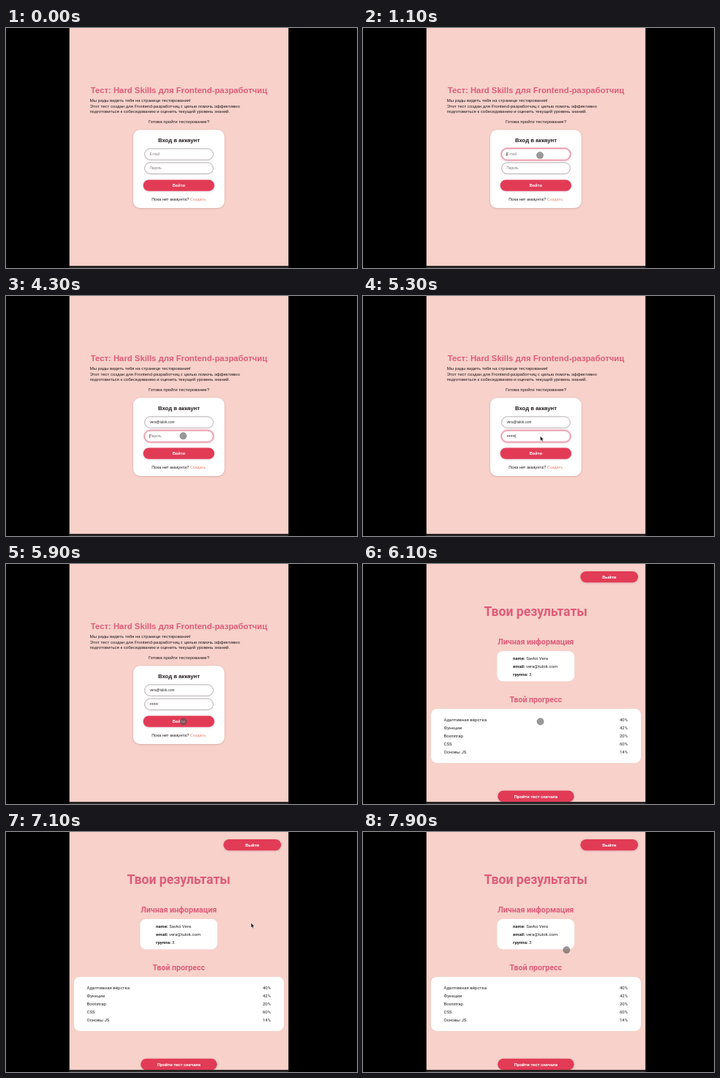
Animation of 480x328 px, one loop 8000 ms. Source, as an HTML page:

```html
<!DOCTYPE html>
<html lang="ru">
<head>
<meta charset="utf-8">
<title>Тест: вход и результаты</title>
<style>
html, body { margin: 0; width: 100%; height: 100%; overflow: hidden; background: #000; }
svg { display: block; width: 100vw; height: 100vh; }
.arial { font-family: "Liberation Sans", Arial, sans-serif; fill: #1d1718; }
.roboto { font-family: Roboto, sans-serif; fill: #222; }
text { white-space: pre; }
</style>
</head>
<body>
<svg id="stage" viewBox="0 0 480 328"></svg>
<script>
const LOOP = 8000, STEP = 200;
const EMAIL = "vera@tulok.com";
const PINK = "#f7d1ca", ROSE = "#df5c79", RED = "#e23a57";

const text = (x, y, size, str, attrs = "") =>
  `<text x="${x}" y="${y}" font-size="${size}" ${attrs}>${str}</text>`;
const mid = 'text-anchor="middle"', bold = 'font-weight="700"';
const title = (x, y, size, str) => text(x, y, size, str, `${mid} ${bold} fill="${ROSE}"`);
const box = (x, y, w, h, r, fill, attrs = "") =>
  `<rect x="${x}" y="${y}" width="${w}" height="${h}" rx="${r}" fill="${fill}" ${attrs}/>`;
const button = (x, y, w, size, label) =>
  box(x, y, w, 15.4, 7.7, RED, 'filter="url(#soft)"') +
  text(x + w / 2, y + 9.8, size, label, `${mid} ${bold} fill="#fff"`);
const field = (id, y) => `
  <rect id="${id}Glow" x="188.7" y="${y - 0.7}" width="95.6" height="16.9" rx="8.4"
    fill="none" stroke="#ec7f97" stroke-opacity=".4" stroke-width="2.4"/>
  <rect id="${id}Box" x="189.6" y="${y}" width="93.8" height="15.4" rx="7.7" fill="#fff" stroke-width=".9"/>
  ${text(196.5, y + 9.2, 4.7, "", `id="${id}Text"`)}
  <path id="${id}Caret" stroke="#222" stroke-width=".6"/>`;

const login = `<g id="login" class="arial">
  ${text(115.7, 89.3, 11.32, "Тест: Hard Skills для Frontend-разработчиц", `${bold} fill="${ROSE}"`)}
  ${["Мы рады видеть тебя на странице тестирования!",
     "Этот тест создан для Frontend-разработчиц с целью помочь эффективно",
     "подготовиться к собеседованию и оценить текущий уровень знаний."]
    .map((s, i) => text(114.8, 101.4 + i * 7.1, 6.02, s)).join("")}
  ${text(236.5, 130.3, 6.02, "Готова пройти тестирование?", mid)}
  ${box(174, 139.3, 124.6, 106.8, 9.5, "#fff", 'filter="url(#soft)"')}
  ${text(236.5, 155.6, 7.7, "Вход в аккаунт", `${mid} ${bold}`)}
  ${field("email", 164.9)}${field("pass", 184)}
  ${button(187.6, 207.4, 97.4, 5.65, "Войти")}
  ${text(236.2, 235.8, 5.67, 'Пока нет аккаунта? <tspan fill="#e8806f">Создать</tspan>', mid)}
</g>`;

const info = [["name", "Savko Vera"], ["email", EMAIL], ["группа", "3"]];
const progress = [["Адаптивная вёрстка", 40], ["Функции", 42], ["Bootstrap", 20], ["CSS", 60], ["Основы JS", 14]];
const results = `<g id="results" class="roboto">
  ${button(297.4, 9.9, 78.8, 6.1, "Выйти")}
  ${title(236.2, 71.3, 17.6, "Твои результаты")}
  ${title(236.2, 110, 10.65, "Личная информация")}
  ${box(183.4, 119, 105.7, 41.3, 8, "#fff")}
  ${info.map(([k, v], i) =>
    text(205, 130.6 + i * 11, 6, `<tspan font-weight="700">${k}:</tspan> ${v}`)).join("")}
  ${title(236.2, 189, 10.55, "Твой прогресс")}
  ${box(93, 197.9, 287, 74, 8, "#fff")}
  ${progress.map(([k, v], i) => text(110.5, 215.1 + i * 10.95, 6.05, k) +
    text(362.2, 215.1 + i * 10.95, 6.05, v + "%", 'text-anchor="end"')).join("")}
  ${button(184.2, 309.8, 104.4, 6.02, "Пройти тест сначала")}
</g>`;

const popup = `<g id="popup" class="roboto">
  ${box(224.5, -10, 190, 153, 2, "#1f2022", 'filter="url(#deep)"')}
  <g fill="none" stroke="#3d4043" stroke-width="1.5" stroke-linecap="round">
    <path d="M226 14C231 10 233 20 239 17S245 10 250 14S257 21 263 18S268 12 271 17"/>
    <path d="M224.5 3Q229 1 231 -2M280 24H340M345 18C351 23 357 20 360 14S367 4 372 9S381 17 387 8"/>
    <circle cx="351" cy="1" r="6"/>
  </g>
  ${box(281, 14, 53, 11, 1.5, "#292b2f", 'stroke="#45484d" stroke-width=".8"')}
  ${box(305, -5, 32, 20, 2, "#26303f", 'stroke="#46536a" stroke-width=".8"')}
  ${text(310, 12.5, 11, "***", `${bold} fill="#8ab4f8"`)}
  <path d="M332 3V10" stroke="#8ab4f8"/>
  <path d="M297 -6L308.5 13.5H285.5Z" fill="#f28b82" stroke="#f28b82" stroke-linejoin="round"/>
  <path d="M297 1V7M297 9V10.7" stroke="#29211f" stroke-width="1.7"/>
  ${text(234.4, 51.6, 8.5, "Проверьте сохраненные пароли", 'font-weight="500" fill="#e8eaed"')}
  ${["Пароль, который вы только что использовали, был",
     "результате утечки данных. Чтобы защитить свои аккаунты,",
     "измените его прямо сейчас и проверьте сохраненные в",
     "Tulkon Менеджере паролей."]
    .map((s, i) => text(234.4, 69.8 + i * 10.1, 6.05, s, 'fill="#c9cbce"')).join("")}
  <circle cx="240.2" cy="124" r="3.2" fill="none" stroke="#c9cbce" stroke-width=".8"/>
  <path d="M240.2 123.6V125.8M240.2 122V122.7" stroke="#c9cbce" stroke-width=".8"/>
  ${box(313.8, 115, 43.4, 17.6, 8.8, "none", 'stroke="#2f6a86" stroke-width=".9"')}
  ${text(335.5, 126.4, 6.9, "Закрыть", `${mid} font-weight="500" fill="#a8c7fa"`)}
  ${box(361, 115, 60, 17.6, 8.8, "#a8c7fa")}
  ${text(369, 126.4, 6.9, "Проверить", 'font-weight="500" fill="#123a70"')}
</g>`;

const shadow = (id, dy, blur, alpha) =>
  `<filter id="${id}" x="-20%" y="-30%" width="140%" height="170%">
    <feDropShadow dx="0" dy="${dy}" stdDeviation="${blur}" flood-color="#55252c" flood-opacity="${alpha}"/></filter>`;

const $ = id => document.getElementById(id);
$("stage").innerHTML = `
  <defs>${shadow("soft", 0.6, 1, 0.25)}${shadow("deep", 1, 2, 0.5)}
    <clipPath id="page"><rect x="86.5" width="300" height="325"/></clipPath></defs>
  <rect width="480" height="328"/>
  ${box(86.5, 325, 300, 3, 0, "#292624")}
  <g clip-path="url(#page)">
    ${box(86.5, 0, 300, 325, 0, PINK)}
    ${login}${results}${popup}
    <path id="arrow" d="M0 0V7L1.6 5.5L2.7 8L4 7.4L2.9 5H5Z" fill="#111" stroke="#fff" stroke-width=".6"/>
    <circle id="press" r="4.6" fill="#555" fill-opacity=".6" stroke="#555" stroke-opacity=".45" stroke-width=".8"/>
  </g>`;

// Pointer path: time, x, y
const path = [
  [500, 300, 225], [1000, 242, 174], [3500, 242, 174], [4100, 242.3, 191.2], [5300, 242.3, 191.2],
  [5700, 242.5, 215.3], [6500, 242.5, 215.3], [6900, 335, 124], [7100, 335, 124], [7700, 278.3, 161.2], [8000, 278.3, 161.2]
];
const within = (t, spans) => spans.some(([a, b]) => t >= a && t < b);
const show = (id, on) => $(id).setAttribute("visibility", on ? "visible" : "hidden");
const clamp = (v, max) => Math.max(0, Math.min(max, Math.floor(v)));

function pointer(t) {
  const i = path.findIndex(p => p[0] > t);
  if (i < 1) return path[i < 0 ? path.length - 1 : 0].slice(1);
  const [a, x, y] = path[i - 1], [b, u, v] = path[i];
  const p = (t - a) / (b - a), k = p * p * (3 - 2 * p);
  return [x + (u - x) * k, y + (v - y) * k];
}

function drawField(id, y, value, hint, focus) {
  const label = $(id + "Text");
  label.textContent = value || hint;
  label.style.fill = value ? "#222" : "#82767a";
  show(id + "Glow", focus);
  $(id + "Box").setAttribute("stroke", focus ? "#dc6f88" : "#aca2a7");
  const x = 196.6 + (value ? label.getComputedTextLength() : 0);
  $(id + "Caret").setAttribute("d", focus ? `M${x} ${y + 5}v5.2` : "");
}

function draw(time) {
  const t = Math.max(0, Math.floor((time + 100) / STEP) * STEP - 100);
  const done = t >= 6100;
  $("login").style.display = done ? "none" : "";
  $("results").style.display = done ? "" : "none";
  $("popup").style.display = within(t, [[6300, 7100]]) ? "" : "none";

  if (!done) {
    const n = (t - 1300) / STEP;
    const typed = clamp(n <= 6 ? n : 6 + (n - 6) * 2, EMAIL.length);
    drawField("email", 164.9, EMAIL.slice(0, typed), "E-mail", within(t, [[1100, 4100]]));
    drawField("pass", 184, "•".repeat(clamp((t - 4300) / 130, 7)), "Пароль", within(t, [[4100, 5700]]));
  }

  const [x, y] = pointer(t);
  const pressed = within(t, [[1100, 1300], [4100, 4500], [5700, 6300], [6900, 7100], [7700, 8000]]);
  const moving = within(t, [[500, 1100], [3500, 4100], [5300, 5700], [6300, 6900], [7100, 7700]]);
  for (const id of ["arrow", "press"]) $(id).setAttribute("transform", `translate(${x} ${y})`);
  show("press", pressed);
  show("arrow", moving);
}

function frame() {
  draw(performance.now() % LOOP);
  requestAnimationFrame(frame);
}
frame();
</script>
</body>
</html>
```
